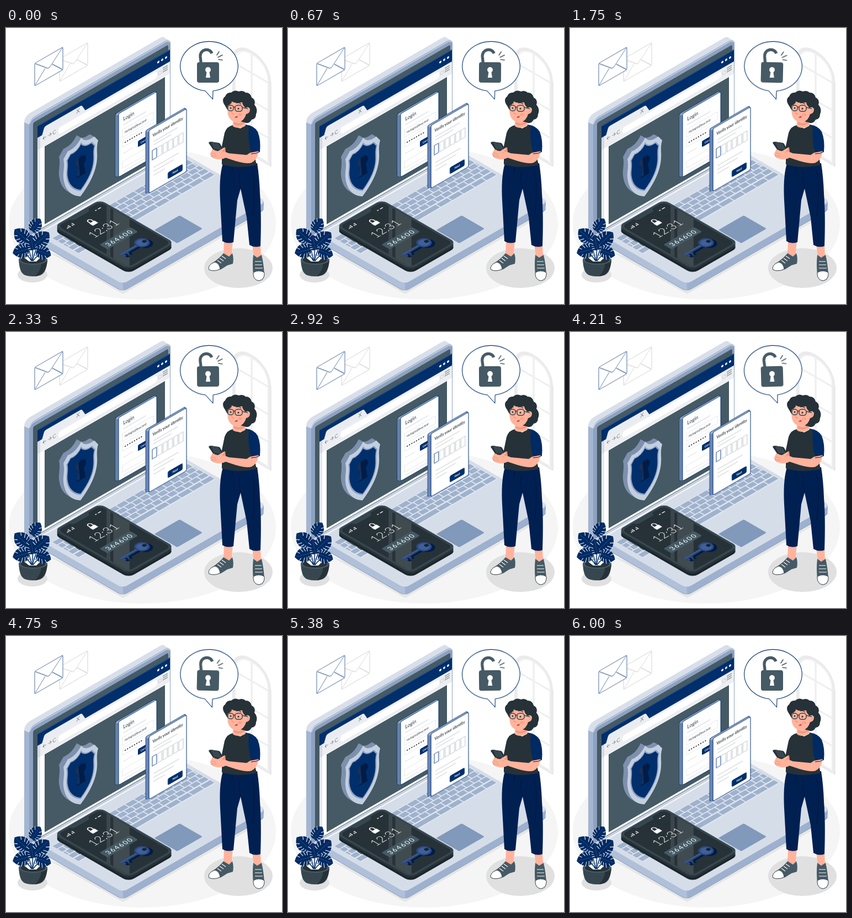
Recreate the animation shown at these times as an HTML page. Size 500 px wide and 500 px high, loop 6.04 s.

```html
<!DOCTYPE html>
<html lang="en">
<head>
<meta charset="utf-8">
<title>Two-step login</title>
<style>
  html, body { margin: 0; width: 100%; height: 100%; overflow: hidden; background: #fff; }
  svg { display: block; width: 100vw; height: 100vh; }
  text { font-family: Lato, "Open Sans", sans-serif; }
  .float { animation: float 6040ms linear infinite; }
  .wind { transform-origin: 367px 77px; animation: wind 6040ms linear infinite; }
  /* four 1500 ms swings, then a 40 ms rest */
  @keyframes float {
    0%, 24.834%, 49.669%, 74.503%, 99.338%, 100% { transform: translateY(0); }
    12.417%, 37.252%, 62.086%, 86.921% { transform: translateY(-10px); }
  }
  @keyframes wind {
    0%, 99.338%, 100% { transform: rotate(0deg); }
    6.209%, 31.043%, 55.877%, 80.712% { transform: rotate(2deg); }
    18.626%, 43.46%, 68.295%, 93.129% { transform: rotate(-2deg); }
  }
</style>
</head>
<body>
<svg viewBox="0 0 500 500" xmlns="http://www.w3.org/2000/svg">
<defs>
  <path id="shield" d="M136 277C131 286 122 290 112 288L104 298C107 312 103 320 104 331C106 355 119 373 135 383C151 371 164 354 165 331C166 322 163 312 167 300L160 289C150 291 141 287 136 277Z"/>
  <g id="leaf">
    <path d="M0 15C-5 18-14 12-14 2C-14-7-7-13 0-17C7-13 14-7 14 2C14 12 5 18 0 15Z" fill="#002a62"/>
    <path d="M-15-3L-6 2M-16 4L-6 7M-12 11L-5 11M-10-11L-5-5M15-3L6 2M16 4L6 7M12 11L5 11M10-11L5-5" stroke="#fff" stroke-width="1.1"/>
    <path d="M0 15V-14" stroke="#40639c" stroke-width=".6"/>
  </g>
  <g id="mail" fill="#fff" stroke-width="1.4" stroke-linejoin="round">
    <rect width="51" height="41" rx="2"/>
    <path d="M1 40L19 20M50 40L32 20M1 1L23 22Q25.500 24 28 22L50 1" fill="none"/>
  </g>
  <rect id="lid" x="42" y="190" width="256" height="215" rx="10"/>
  <rect id="slab" width="96" height="156" rx="11"/>
  <clipPath id="glass"><rect x="4" y="4" width="88" height="148" rx="8"/></clipPath>
</defs>

<!-- floor -->
<ellipse cx="247" cy="354" rx="242" ry="138" fill="#f5f5f5"/>
<ellipse cx="421" cy="435" rx="62" ry="36" fill="#e0e0e0"/>
<ellipse cx="48" cy="447" rx="27" ry="14" fill="#e0e0e0"/>
<path d="M70 402L212 482L460 340L452 330L212 460Z" fill="#e6e6e6"/>

<!-- window -->
<g transform="translate(411 0) skewY(30)" fill="none" stroke="#e6e6e6">
  <path d="M2 209V58C2 13 66 13 66 58V209Z" stroke="#ebebeb" stroke-width="6" fill="#fff"/>
  <path d="M5 209V58C5 18 63 18 63 58V209" stroke="#f7f7f7" stroke-width="2"/>
  <path d="M34 25V209M4 62H64M4 112H64M4 162H64" stroke="#efefef" stroke-width="3.500"/>
  <path d="M69 58V211" stroke-width="1.500"/>
</g>

<!-- envelopes -->
<use href="#mail" transform="translate(97 56) skewY(-30)" stroke="#e0e0e0"/>
<use href="#mail" transform="translate(52 64) skewY(-30)" stroke="#8299bb"/>

<!-- laptop base -->
<g transform="matrix(.866 -.5 .866 .5 85 395)">
  <rect x="-10" y="-22" width="300" height="178" rx="9" fill="#8da3c3"/>
</g>
<path d="M61 376V390L205 473Q212 477 219 473L462 332Q467 329 467 322V314Z" fill="#9db0cd"/>
<path d="M61 376V390L205 473Q209 475 212 475V455Z" fill="#b0c0d8"/>
<g transform="matrix(.866 -.5 .866 .5 85 381)">
  <rect x="-10" y="-22" width="300" height="178" rx="9" fill="#d5dde9"/>
  <rect x="121" y="91" width="53" height="48" rx="2" fill="#8199ba"/>
  <rect x="-1" y="-2" width="286" height="58" rx="2" fill="#dfe5ee"/>
  <g stroke="#9fb2cd" stroke-width="9.200" fill="none">
    <path d="M0 4H284" stroke-dasharray="17 2"/>
    <path d="M0 15H284" stroke-dasharray="14 2" stroke-dashoffset="5"/>
    <path d="M0 26H284" stroke-dasharray="14 2" stroke-dashoffset="11"/>
    <path d="M0 37H284" stroke-dasharray="14 2" stroke-dashoffset="2"/>
    <path d="M0 49H284" stroke-dasharray="22 2"/>
    <path d="M90 49H160"/>
  </g>
</g>

<!-- laptop screen -->
<g transform="skewY(-30)">
  <g fill="#d8dfea">
    <use href="#lid" x="-9" y="-11"/><use href="#lid" x="-6" y="-7"/><use href="#lid" x="-3" y="-4"/>
  </g>
  <path d="M33 190L43 200V405L33 393Z" fill="#a3b5d0"/>
  <use href="#lid" fill="#8da2c1"/>
  <path d="M43 198Q45 192 52 192H288Q295 192 297 197" fill="none" stroke="#c3cfe0" stroke-width="2"/>
  <rect x="49" y="200" width="245" height="201" rx="3" fill="#455a64"/>
  <path d="M44 403H298" stroke="#c6d1e0" stroke-width="4"/>

  <!-- browser -->
  <rect x="57" y="211" width="240" height="189" fill="#fff"/>
  <rect x="57" y="211" width="240" height="22" fill="#002f6c"/>
  <path d="M57 211H297" stroke="#214b8b" stroke-width="1.500"/>
  <path d="M65 233L69 221Q70 219 73 219H134Q137 219 138 221L144 233Z" fill="#e9ecf1"/>
  <rect x="57" y="232" width="240" height="22" fill="#eceef1"/>
  <rect x="57" y="211" width="5" height="189" fill="#002456" opacity=".1"/>
  <rect x="95" y="236" width="179" height="12" rx="5" fill="#fff"/>
  <g fill="#fff"><circle cx="276" cy="221" r="2"/><circle cx="283" cy="221" r="2"/><circle cx="290" cy="221" r="2"/></g>
  <path d="M284 237H293M284 240.500H293M284 244H293" stroke="#8b959b" stroke-width="1.500"/>
  <circle cx="279" cy="242" r="3" fill="none" stroke="#ccd1d5"/>
  <path d="M128 222L133 229M133 222L128 229M73 239H67M69.500 236L67 239L69.500 242M76 239H82M79.500 236L82 239L79.500 242M90 237A3 3 0 1 0 90.500 241" stroke="#79868e" stroke-width=".9" fill="none"/>
  <rect x="70" y="255" width="218" height="141" fill="#455a64"/>

  <!-- shield -->
  <g fill="#7e90ad"><use href="#shield" x="-8" y="-9"/><use href="#shield" x="-5" y="-6"/><use href="#shield" x="-3" y="-3"/></g>
  <use href="#shield" fill="#c3cfe0"/>
  <use href="#shield" transform="translate(136 329) scale(.8) translate(-136 -329)" fill="#002f6c" stroke="#8a9fc0" stroke-width="2.500"/>
  <path d="M131 327A9 9 0 1 1 141 327L144 346H128Z" fill="#001d47"/>
  <path d="M129 325A9 9 0 0 1 131 310L134 344H128L131 327Z" fill="#16305b"/>
</g>

<!-- login card -->
<g transform="skewY(-30)">
  <rect x="198" y="270" width="73" height="115" rx="3" fill="#91a6c8" stroke="#002f6c" stroke-width=".8"/>
  <path d="M198.500 272L204 276V387L198.500 383Z" fill="#6682b0"/>
  <rect x="204" y="273" width="69" height="115" rx="2.500" fill="#fff" stroke="#002f6c" stroke-width=".9"/>
  <text transform="translate(212.500 291) scale(.866 1)" font-size="9.600" fill="#263238">Login</text>
  <path d="M212 298H254" stroke="#d7d9db" stroke-width="1.400"/>
  <g fill="#fff" stroke="#dfe2e5" stroke-width=".8">
    <rect x="211" y="306" width="56" height="14"/><rect x="211" y="325" width="56" height="13"/><rect x="211" y="364" width="56" height="12"/>
  </g>
  <text transform="translate(215 315) scale(.866 1)" font-size="5.900" fill="#263238">mylogin@box.test</text>
  <path d="M216 331.500H247" stroke="#263238" stroke-width="2.200" stroke-linecap="round" stroke-dasharray="0 4.200"/>
  <rect x="239" y="343" width="28" height="11" rx="2" fill="#002f6c"/>
  <text transform="translate(244 350.500) scale(.866 1)" font-size="5" font-weight="700" fill="#fff">Confirm</text>
  <path d="M212 350H230M212 382H258" stroke="#e3e5e8" stroke-width="1.200"/>
</g>

<!-- code card -->
<g class="float"><g transform="skewY(-30)">
  <rect x="253" y="332" width="72" height="114" rx="3" fill="#a5b6d2" stroke="#002f6c" stroke-width=".9"/>
  <path d="M253.500 334L259 338V449L253.500 444Z" fill="#6a86b4"/>
  <rect x="259" y="335" width="68" height="114" rx="2.500" fill="#fff" stroke="#002f6c" stroke-width="1"/>
  <text transform="translate(265.500 351) scale(.866 1)" font-size="7.600" fill="#263238" stroke="#263238" stroke-width=".15">Verify your identity</text>
  <path d="M267 360H311M267 366H300M267 407H313M267 414H304M267 421H288" stroke="#d7d9db" stroke-width="1.400"/>
  <g fill="#fff" stroke="#b1b8bd" stroke-width=".8">
    <rect x="274.700" y="375" width="7.500" height="17"/><rect x="284.400" y="375" width="7.500" height="17"/><rect x="294.100" y="375" width="7.500" height="17"/><rect x="303.800" y="375" width="7.500" height="17"/><rect x="313.500" y="375" width="7.500" height="17"/>
    <rect x="265" y="375" width="7.500" height="17" stroke="#2e5596" stroke-width="1"/>
  </g>
  <rect x="293" y="431" width="27" height="12" rx="2.500" fill="#002f6c"/>
  <text transform="translate(306.500 439) scale(.866 1)" font-size="5.200" font-weight="700" fill="#fff" text-anchor="middle">Next</text>
</g></g>

<!-- phone -->
<use href="#slab" transform="matrix(.866 -.5 .866 .5 87 367)" fill="#1b2529"/>
<use href="#slab" transform="matrix(.866 -.5 .866 .5 87 363)" fill="#263238"/>
<path d="M113 382L121 387M126 390L134 395" stroke="#455a64" stroke-width="2"/>
<g transform="matrix(.866 -.5 .866 .5 87 359)">
  <use href="#slab" fill="#37474f"/>
  <rect x="4" y="4" width="88" height="148" rx="8" fill="#263238"/>
  <g clip-path="url(#glass)" fill="#fff">
    <path d="M4 120L96 28V62L4 154Z" opacity=".12"/><path d="M4 106L96 14V22L4 114Z" opacity=".1"/>
    <path d="M28 3H68Q66 10 61 10H35Q30 10 28 3Z" fill="#37474f"/>
  </g>
</g>
<g transform="matrix(.866 -.5 .866 .5 87 363)">
  <path d="M14 15V13M17 15V11M20 15V9M25 15V12M28 15V9M75 11H78M81 11H87" stroke="#fff" stroke-width="1.500"/>
  <path d="M47.500 28V24A3.500 3.500 0 0 1 54.500 24V28" fill="none" stroke="#fff" stroke-width="1.600"/>
  <rect x="45.500" y="28" width="11" height="8" rx="1" fill="#fff"/>
  <text x="51" y="60" font-size="21.500" font-weight="300" fill="#fff" text-anchor="middle">12:31</text>
  <rect x="18" y="77" width="64" height="17" rx="3" fill="#455a64"/>
  <text x="51" y="90" font-size="12" letter-spacing="2" fill="#fff" text-anchor="middle">364600</text>
  <g transform="translate(2 4)" fill="#001c45">
    <circle cx="66" cy="119" r="11.500"/><path d="M21 117H56V121H34V125H30V121H27V126H22V121H21Z"/>
  </g>
  <g fill="#2d4a80">
    <path d="M21 115.500H56V120.500H34V124.500H30V120.500H27V125H22V120.500H21Z"/>
    <circle cx="66" cy="118" r="11.500"/><circle cx="66" cy="118" r="8.500" fill="#3f5f98"/>
    <circle cx="71" cy="118" r="3.500" fill="#14233c"/>
    <path d="M22 117H55" stroke="#4f6ea4"/>
  </g>
</g>

<!-- plant -->
<path d="M23 419C24 436 27 445 35 448Q48 452 62 448C70 445 74 436 75 419Z" fill="#37474f"/>
<path d="M52 450Q72 449 75 421L64 426Q63 440 52 450Z" fill="#263238"/>
<ellipse cx="49" cy="420" rx="26" ry="9" fill="#455a64"/><ellipse cx="49" cy="420" rx="22" ry="7" fill="#263238"/>
<path d="M34 417Q46 406 62 416L55 423H42Z" fill="#fff"/>
<path d="M47 422Q49 390 54 366M46 422Q41 390 29 378M48 422Q53 399 64 386M46 422Q39 409 28 405M49 422Q57 410 68 408" fill="none" stroke="#002a62" stroke-width="1.400"/>
<use href="#leaf" transform="translate(54 357) rotate(35) scale(.83)"/>
<use href="#leaf" transform="translate(28 376) rotate(-48) scale(.98)"/>
<use href="#leaf" transform="translate(47 389) rotate(-12) scale(.85)"/>
<use href="#leaf" transform="translate(65 382) rotate(48) scale(1.020)"/>
<use href="#leaf" transform="translate(27 404) rotate(-105) scale(.9)"/>
<use href="#leaf" transform="translate(68 407) rotate(110) scale(.85)"/>

<!-- speech bubble -->
<g class="wind">
  <path d="M361 114A52.300 45 0 1 1 375 114L374.500 129Z" fill="#fff" stroke="#002f6c" stroke-width="1.100" stroke-linejoin="round"/>
  <path d="M353.500 65L352 52C351 38 369 35 373 46" fill="none" stroke="#455a64" stroke-width="5.200"/>
  <rect x="346" y="62" width="40" height="37" rx="4" fill="#455a64"/>
  <path d="M363.500 80A5 5 0 1 1 368.500 80L370 90H362Z" fill="#fff"/>
  <path d="M382 49L386 43M384 53L392 49M385 57L392 58" stroke="#455a64" stroke-width="1.600" stroke-linecap="round"/>
</g>

<!-- woman: feet and trousers -->
<path d="M395 385L394 413L408 415L411 385ZM446 390L449 416L462 415L461 390Z" fill="#ffb39c"/>
<g stroke-linejoin="round">
  <path d="M394 408Q386 418 372 427Q365 433 368 438Q376 442 390 437L401 430L411 427Q413 416 410 408L404 414Z" fill="#455a64"/>
  <path d="M372 427Q365 433 368 438Q376 442 388 437Q387 426 378 424Z" fill="#fff" stroke="#37474f" stroke-width="1"/>
  <path d="M448 411Q446 428 448 447Q449 457 458 458Q468 457 468 447Q467 428 463 411L455 416Z" fill="#455a64"/>
  <path d="M448 443Q447 456 458 458Q469 456 468 443Q458 437 448 443Z" fill="#fff" stroke="#37474f" stroke-width="1"/>
  <path d="M383 421L390 426M387 417L394 422M391 413L398 418M451 423H463M451 429H464M451 435H465" stroke="#fff" stroke-width="1.100"/>
</g>
<path d="M393 245C387 265 387 290 388 312L392 386Q401 392 412 388L419 312L425 291L436 343L441 393Q451 399 461 395Q463 340 460 300Q459 270 455 245Z" fill="#002052"/>
<path d="M425 291Q421 274 422 260M447 258Q453 290 447 340M410 252Q411 258 408 265" fill="none" stroke="#00153a" stroke-width="1"/>

<!-- woman: torso, arms, phone -->
<path d="M434 175Q450 177 456 188Q462 203 460 224L441 229L430 190Z" fill="#002a62"/>
<path d="M411 176Q400 178 396 190L391 214V247Q420 256 454 248Q448 224 447 203Q446 185 436 176L424 182Z" fill="#263238"/>
<path d="M440 179Q452 184 456 194Q460 208 459 224L445 228Q437 205 440 179Z" fill="#002a62"/>
<path d="M412 166L411 178Q421 185 434 176L432 162Z" fill="#ffb39c"/>
<path d="M413 170Q421 176 431 169L431 173Q420 180 412 173Z" fill="#ee9a83"/>
<path d="M388 222Q394 216 397 216L398 225Q390 236 380 237Q371 236 370 228L374 220Z" fill="#ee9a83"/>
<path d="M371 206L385 208Q387 208 388 210L394 221Q394 224 391 224L378 222Q376 222 375 220L367 208Q368 206 371 206Z" fill="#263238"/>
<path d="M371 206L384 208L391 221L377 219Z" fill="#37474f"/>
<path d="M458 223Q455 239 445 244Q437 247 416 241L398 235Q387 241 377 236Q371 232 371 225L376 220Q382 225 386 222L394 217Q396 219 393 223L404 227L436 230L442 226Z" fill="#ffb39c"/>
<path d="M373 226L381 229M374 231L382 233M393 223L389 227" stroke="#e58c75" stroke-width=".8" fill="none"/>
<path d="M444 228Q453 228 460 224" stroke="#00153a" fill="none"/>

<!-- woman: head -->
<path d="M397 141Q389 130 397 124Q400 116 408 117Q414 111 422 115Q429 112 434 117Q443 117 445 126Q453 130 450 139Q457 147 453 156Q453 165 445 166Q440 175 432 171L420 168L402 150Z" fill="#263238"/>
<path d="M402 139Q408 137 409 130Q418 137 430 134L433 145Q440 141 442 147Q442 155 435 156Q432 168 421 171Q408 171 403 160Q400 150 402 139Z" fill="#ffb39c"/>
<path d="M401 141Q400 133 407 128Q418 128 431 132L434 144Q428 140 428 134Q417 138 409 133Q408 138 401 141Z" fill="#263238"/>
<path d="M412 147Q408 152 409 155L413 156" fill="none" stroke="#e58c75" stroke-width="1"/>
<path d="M414 162Q417 159 420 160Q419 164 414 162Z" fill="#b9433f"/>
<g fill="#263238"><circle cx="407" cy="145" r="1.500"/><circle cx="421" cy="146" r="1.600"/></g>
<path d="M403 137Q406 135 409 136M417 136Q422 134 426 138" fill="none" stroke="#263238" stroke-width="1.200"/>
<g fill="none" stroke="#37474f" stroke-width="1.500"><rect x="402" y="140" width="10" height="10" rx="4"/><rect x="415" y="140" width="13" height="11" rx="4.500"/><path d="M412 144Q413 142 415 144M428 144L438 146"/></g>
<ellipse cx="424" cy="157" rx="4" ry="2.500" fill="#f99886" opacity=".65"/>
<path d="M436 147Q440 147 438 152" fill="none" stroke="#e58c75" stroke-width=".9"/>
</svg>
</body>
</html>
```
